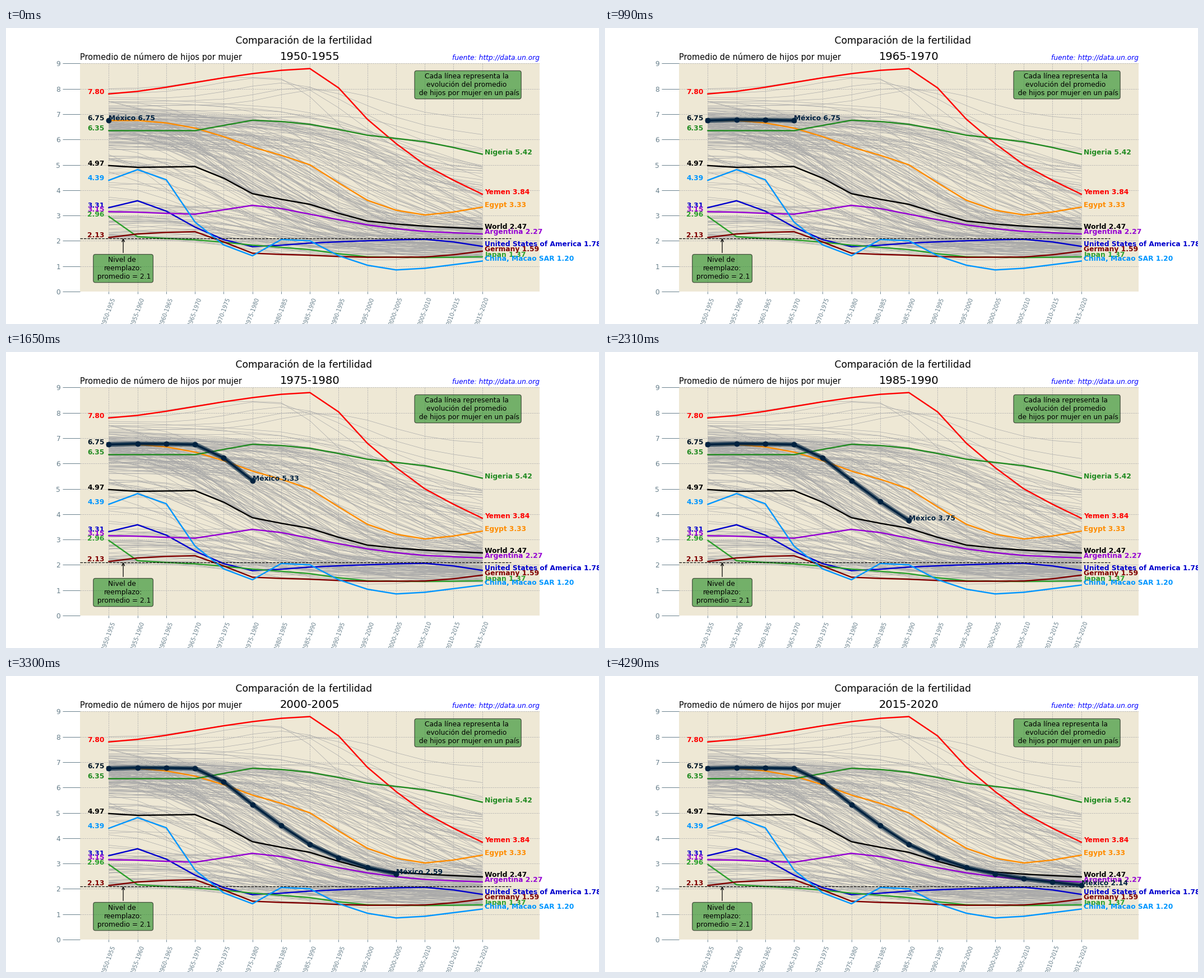
These frames come from a looping animation (1058 px wide and 529 px high, 4.62 s). A matplotlib script:

```python
import numpy as np
import matplotlib.pyplot as plt
from matplotlib.animation import FuncAnimation
from matplotlib.collections import LineCollection

W, H = 1058, 529
N = 14
SLATE, NAVY = "#68808c", "#002240"
PERIODS = [f"{y}-{y + 5}" for y in range(1950, 2020, 5)]
t = np.arange(N)
KEYS = [0, *range(1, N, 2)]

plt.rcParams["font.family"] = "DejaVu Sans"
fig, ax = plt.subplots(figsize=(12, 6), dpi=W / 12)
fig.subplots_adjust(left=0.125, right=0.9, bottom=0.11, top=0.88)


def curve(*vals, keys=KEYS):
    """Monotone cubic through a few key values, sampled at every period."""
    x, y = np.array(keys), np.array(vals)
    d = np.diff(y) / np.diff(x)
    a, b = d[:-1], d[1:]
    m = np.r_[d[0], np.where(a * b > 0, 2 * a * b / (a + b + 1e-9), 0), d[-1]]
    k = np.clip(np.searchsorted(x, t, "right") - 1, 0, len(x) - 2)
    h = x[k + 1] - x[k]
    s = (t - x[k]) / h
    ease = s * s * (3 - 2 * s)
    bend = s * (1 - s) * (m[k] * (1 - s) - m[k + 1] * s)
    return y[k] + (y[k + 1] - y[k]) * ease + h * bend


SERIES = [
    ("Yemen", "#ff0000", curve(7.8, 7.9, 8.25, 8.6, 8.8, 6.8, 5.0, 3.84)),
    ("Egypt", "#ff8c00", curve(6.75, 6.75, 6.45, 5.7, 5.0, 3.6, 3.02, 3.33)),
    ("Nigeria", "#228b22", curve(6.35, 6.35, 6.35, 6.76, 6.6, 6.17, 5.91, 5.42)),
    ("World", "#000000", curve(4.97, 4.9, 4.93, 3.86, 3.44, 2.78, 2.58, 2.47)),
    ("United States of America", "#0000cd",
     curve(3.31, 3.58, 2.54, 1.77, 1.91, 2.0, 2.06, 1.78)),
    ("Argentina", "#9400d3", curve(3.15, 3.13, 3.05, 3.4, 3.05, 2.63, 2.37, 2.27)),
    ("Japan", "#2ca02c", curve(2.96, 2.16, 2.04, 1.83, 1.65, 1.37, 1.34, 1.37)),
    ("Germany", "#800000", curve(2.13, 2.27, 2.36, 1.51, 1.43, 1.35, 1.36, 1.59)),
    ("China, Macao SAR", "#0096ff",
     curve(4.39, 4.81, 4.41, 2.74, 1.41, 2.05, 2.0, 1.41, 0.85, 1.2,
           keys=[0, 1, 2, 3, 5, 6, 7, 8, 10, 13])),
]
MEXICO = curve(6.75, 6.78, 6.75, 5.33, 3.75, 2.85, 2.4, 2.14)


def country(rng, start, end, mid, width, hump, wobble):
    """Logistic fall from start to end, with a hump before it and some wobble."""
    fall = 1 / (1 + np.exp(-(t - mid) / width))
    fall = (fall - fall[0]) / (fall[-1] - fall[0])
    noise = np.convolve(rng.normal(0, wobble, N + 2), [0.25, 0.5, 0.25], "valid")
    bump = hump * np.exp(-((t - mid + 3) / 2.5) ** 2)
    return np.clip(start + (end - start) * fall + bump + noise, 1.13, 8.45)


def world_lines():
    rng = np.random.default_rng(11)
    u = rng.uniform
    rows = []
    for _ in range(52):   # late decline
        rows.append(country(rng, rng.normal(6.5, 0.4), 2.5 + 3.2 * u() ** 1.3,
                            u(8, 12), u(1.5, 2.6), u(0, 0.4), 0.05))
    for _ in range(78):   # decline from the 1970s on
        rows.append(country(rng, np.clip(rng.normal(6.4, 0.5), 4.9, 7.4), 1.4 + 1.5 * u(),
                            u(3.5, 8), u(1.1, 2.1), u(0, 0.3), 0.06))
    for _ in range(16):   # middle start
        rows.append(country(rng, u(3.6, 5.4), u(1.25, 2.3),
                            u(2.5, 6.5), u(0.9, 1.8), u(0, 0.4), 0.09))
    for _ in range(40):   # early low fertility
        rows.append(country(rng, 2.05 + 1.6 * u() ** 1.5, u(1.25, 2.0),
                            u(3.5, 7.5), u(0.9, 1.7), u(0, 0.25), 0.07))
    for i in range(5):    # a few that stay on top
        rows.append(country(rng, 8.0 - 0.17 * i, 4.2 + 0.65 * i,
                            8.3 + 0.6 * i, 1.0 + 0.2 * i, 0.75, 0.04))
    return [np.column_stack([t, r]) for r in rows]


# axes
ax.set_facecolor("#eee8d5")
ax.set(xlim=(-1, 15), ylim=(0, 9))
ax.set_xticks(t, PERIODS, rotation=70, fontsize=8)
ax.set_yticks(range(10))
ax.tick_params(axis="x", colors=SLATE)
ax.tick_params(axis="y", colors=SLATE, length=25)
for spine in ax.spines.values():
    spine.set_visible(False)
ax.set_axisbelow(True)
ax.grid(color="#b0b0b0", ls="--", lw=0.6)

# titles
fig.text(0.5, 1 - 28 / H, " Comparación de la fertilidad", ha="center", fontsize=14)
ax.set_title("Promedio de número de hijos por mujer", loc="left", fontsize=11.9, pad=5.4)
ax.set_title("fuente: http://data.un.org", loc="right", fontsize=10, pad=5.4,
             style="italic", color="blue")
period = ax.set_title(PERIODS[0], fontsize=16, pad=5.4)

# fixed lines and their labels
ax.add_collection(LineCollection(world_lines(), colors="#a9a9a9", linewidths=0.55, zorder=2))
bold = dict(fontsize=10, weight="bold")
for name, color, vals in SERIES:
    ax.plot(t, vals, color=color, lw=2, zorder=3)
    ax.text(13.09, vals[-1], f"{name} {vals[-1]:.2f}", color=color, **bold)
    if name != "Egypt":
        ax.text(-0.15, vals[0], f"{vals[0]:.2f}", color=color, ha="right", **bold)
ax.text(-0.15, MEXICO[0], f"{MEXICO[0]:.2f}", color="#001526", ha="right", **bold)
ax.plot([-1, 14], [2.1, 2.1], color="black", ls="--", lw=1, zorder=3)

# notes
note = dict(ha="center", fontsize=10, zorder=6,
            bbox=dict(boxstyle="round", fc="forestgreen", ec="black", alpha=0.6))
ax.text(12.5, 7.75, "Cada línea representa la \nevolución del promedio \n"
        " de hijos por mujer en un país", **note)
ax.annotate("Nivel de \nreemplazo:\n promedio = 2.1", xy=(0.5, 2.1), xytext=(0.5, 0.5),
            arrowprops=dict(arrowstyle="->", color="black", shrinkB=0), **note)

# growing line
halo, = ax.plot([], [], color=NAVY, lw=7, alpha=0.6, zorder=4)
line, = ax.plot([], [], color=NAVY, lw=3, marker="o", ms=7, zorder=4.1)
tag = ax.text(0, 0, "", color=NAVY, zorder=4.2, **bold)


def update(i):
    for ln in (halo, line):
        ln.set_data(t[:i + 1], MEXICO[:i + 1])
    tag.set_position((i, MEXICO[i]))
    tag.set_text(f"México {MEXICO[i]:.2f}")
    period.set_text(PERIODS[i])
    return halo, line, tag, period


anim = FuncAnimation(fig, update, frames=N, interval=330, repeat=True, repeat_delay=0)
plt.show()
```
